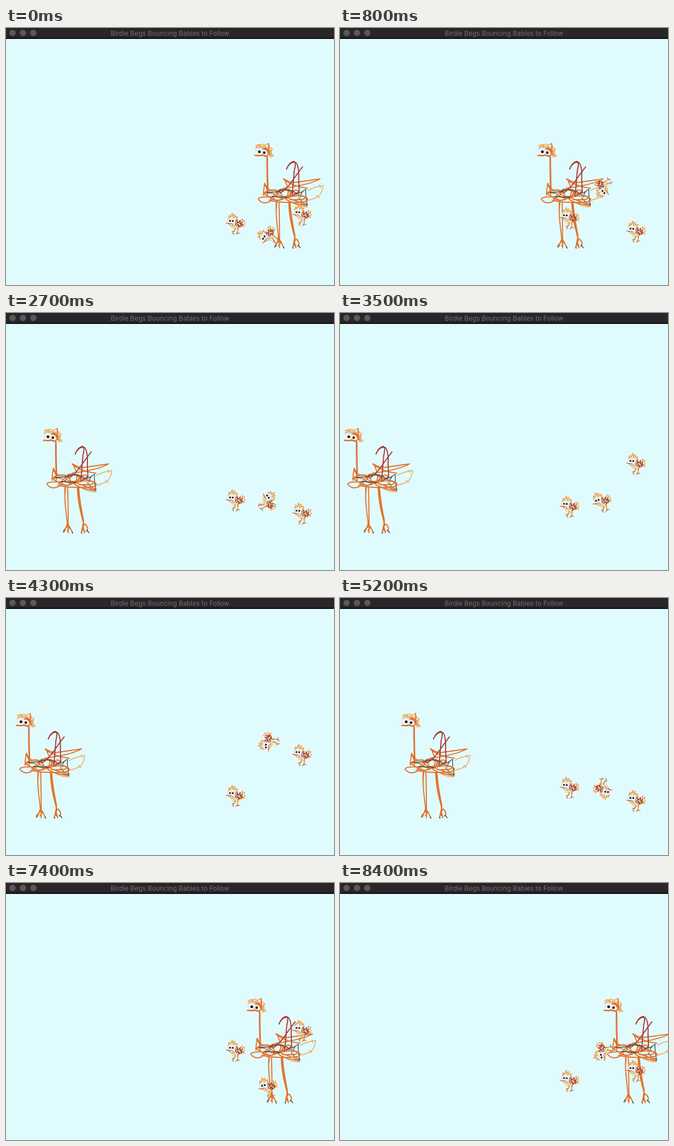
An HTML page for the animation above (8500 ms loop, 600 by 470 pixels).

```html
<!DOCTYPE html>
<html lang="en">
<head>
<meta charset="utf-8">
<title>Birdie Begs Bouncing Babies to Follow</title>
<style>
  html, body { margin: 0; width: 100%; height: 100%; overflow: hidden; background: #e0fbfe; }
  svg { display: block; width: 600px; height: 470px; }
  path { fill: none; stroke-linecap: round; stroke-linejoin: round; }
  .orange { stroke: #e2712a; }
  .light { stroke: #efa860; }
  .red { stroke: #ad3430; }
  .navy { stroke: #2b4650; }
  .yellow { stroke: #f5cf72; }
  .white { fill: #fff; stroke: #b9bcc0; stroke-width: .6; }
  .pupil { fill: #1c2229; }
  #bird path { stroke-width: 1.9; }
  #bird .navy { stroke-width: 1.3; }
  #bird .light { stroke-width: 1.5; }
  #baby path { stroke-width: 1.2; }
  text { font: 12px Inter, Roboto, sans-serif; fill: #747072; text-anchor: middle; }
</style>
</head>
<body>
<svg viewBox="0 0 600 470">
  <defs>
    <!-- Chick, centred on its own origin -->
    <g id="baby">
      <path class="light" style="stroke-width:1.8" d="M-14-9L-12-15-9-12-7-19-5-14-2-17-2-12 3-12 1-9 4-6 0-7M-12-11L-6-16-4-11 1-13M-6-18L-5-11M1-10L2-3"/>
      <path class="yellow" d="M-10 1Q-9 8-3 6Q1 12 5 8Q0 4-5 5Q-9 10-3 10Q2 13 6 9M-7 3L-2 9M8 5Q14 8 15 2Q12-2 10 4"/>
      <path class="light" d="M8-4L12-9 13-4 16-7 15-2 17 0 14 2 16 5 11 4M9 5L12-7"/>
      <path class="red" d="M-2-2L2-6 4-1 8-6 8 0 12-3 10 3 13 2 7 6 4 1 1 5-1 0 4-3 9 2 5 5 2-1 8-3 10 5 3 7"/>
      <path class="yellow" d="M2 2L6-2 9 4M-1 3L3 8"/>
      <path class="navy" style="stroke-width:.6" d="M-3 3L2 1 6 5M5-1L10 2"/>
      <path style="stroke:#c9703c" d="M-1 8L-2 13-6 18M-2 13L-7 15M-6 17L-4 20M4 8L3 19M3 16L0 20M3 17L7 18"/>
      <ellipse class="white" cx="-11" cy="-5" rx="3.6" ry="4.3"/>
      <ellipse class="white" cx="-5" cy="-4.5" rx="3.6" ry="4.2"/>
      <circle class="pupil" cx="-10.8" cy="-5" r="1.8"/>
      <circle class="pupil" cx="-5.6" cy="-4.8" r="1.8"/>
      <path class="orange" d="M-18-1L-9 0-5 2M-17-1L-10 2"/>
      <path style="stroke:#e99a9c" d="M-11 2Q-8 7-6 3L-3 5"/>
    </g>
  </defs>

  <rect width="600" height="470" fill="#e0fbfe"/>

  <g id="bird">
    <g id="legs">
      <path class="orange" d="M495 319Q494 341 497 364L500 390M500 318Q501 350 501 388M496 320L495 332"/>
      <path class="orange" d="M500 384L494 400M501 386L501 402M501 387Q505 393 509 402M499 391L493 397M504 391L499 398"/>
      <path class="orange" style="stroke-width:2.3" d="M518 319Q519 344 524 364L530 388M520 320Q522 346 529 380"/>
      <path class="orange" d="M529 382L525 402M530 387Q525 399 531 399M532 386Q540 394 534 399M528 390L531 402"/>
      <path class="navy" d="M508 400L509 403M525 401L526 403M535 397L539 402M493 398L492 401"/>
    </g>
    <g id="tail">
      <path class="light" d="M553 297Q562 291 581 288Q579 302 572 308Q563 313 552 315M574 287L576 292M569 306L574 310M525 320Q540 328 552 327"/>
      <path class="orange" d="M508 276Q522 289 552 293M509 276Q518 281 525 283L575 276Q555 287 508 293M516 291L511 279"/>
      <path class="navy" d="M549 295Q548 307 552 324Q542 319 536 310M549 295Q541 298 539 309M531 305L543 299"/>
    </g>
    <g id="body">
      <path class="orange" d="M474 284Q471 298 472 306M474 284Q479 296 487 297M473 286Q481 296 479 306"/>
      <path class="orange" d="M487 309Q462 308 462 313Q469 323 482 318Q493 313 480 308Q466 300 484 297Q503 294 498 304Q489 315 475 305"/>
      <path class="orange" d="M471 303Q489 291 502 301Q512 313 496 316Q482 310 498 300Q522 290 523 301Q515 317 498 309Q487 299 473 302"/>
      <path class="orange" d="M484 312Q503 320 515 307Q522 291 502 295Q489 303 506 308Q529 308 536 299Q531 292 520 303Q512 315 530 314Q554 314 545 308L518 299"/>
      <path class="orange" d="M482 315Q505 321 545 318Q556 315 549 309Q530 304 512 312Q519 320 551 325M521 313Q539 318 549 325L552 312"/>
      <path class="navy" d="M478 301L502 299M500 297Q523 294 533 303M487 308L515 310"/>
    </g>
    <path class="red" d="M514 258Q518 246 527 244Q532 245 528 260L524 307M514 257Q521 243 531 246Q537 253 536 277L537 301M543 254Q531 270 524 280Q513 296 502 302M527 306L537 299"/>
    <path class="orange" d="M478 233Q477 261 479 297M479 236L480 296" style="stroke:#d9692a;stroke-width:1.4"/>
    <g id="head">
      <path class="light" d="M457 221L461 213 467 216 459 219 470 212 476 217 465 219 479 212 483 217 472 220M457 215L466 213M482 218L488 221 484 226 490 235 485 233 487 222 481 226 484 236M480 220L486 236"/>
      <path class="orange" d="M481 211L482 228M470 221Q480 217 481 227Q481 236 473 234M474 219L483 232M478 222L470 231"/>
      <ellipse class="white" cx="463.5" cy="227" rx="5.6" ry="5.2"/>
      <ellipse class="white" cx="474" cy="228" rx="4.8" ry="4.8"/>
      <circle class="pupil" cx="464" cy="226.3" r="2.6"/>
      <circle class="pupil" cx="473" cy="228" r="2.4"/>
      <path class="orange" d="M470 221Q479 221 480 228"/>
      <path class="orange" style="stroke-width:2.5" d="M456 233L466 233.5M466 233Q471 232 477 235"/>
    </g>
  </g>

  <use id="left" href="#baby"/>
  <use id="middle" href="#baby"/>
  <use id="right" href="#baby"/>

  <rect width="600" height="18" fill="#292528"/>
  <rect y="18" width="600" height="2" fill="#0c0a0b"/>
  <g fill="#5c585a">
    <circle cx="12" cy="9" r="5.8"/>
    <circle cx="31" cy="9" r="5.8"/>
    <circle cx="50" cy="9" r="5.8"/>
  </g>
  <text x="300" y="14">Birdie Begs Bouncing Babies to Follow</text>
</svg>
<script>
  const LOOP = 8500, STEP = 100, NECK_X = 478;
  const place = (id, x, y, degrees = 0) =>
    document.getElementById(id).setAttribute('transform', `translate(${x} ${y}) rotate(${degrees})`);
  const bounce = (centre, speed, phase, t) => centre + 60 * Math.cos(speed * t + phase);

  function draw(now) {
    const t = Math.floor(now % LOOP / STEP) * STEP / 1000;
    place('bird', 266 + 240.5 * Math.cos(0.7 * t + 0.497) - NECK_X, 0);
    place('left', 420.5, bounce(305, 7.5, -0.5, t));
    place('middle', 480, bounce(320, 5, 0.2, t), -59 - 91.5 * t);
    place('right', 542, bounce(320, 10.006, -1.2, t));
  }

  const start = performance.now();
  function tick() {
    draw(performance.now() - start);
    requestAnimationFrame(tick);
  }
  tick();
</script>
</body>
</html>
```
